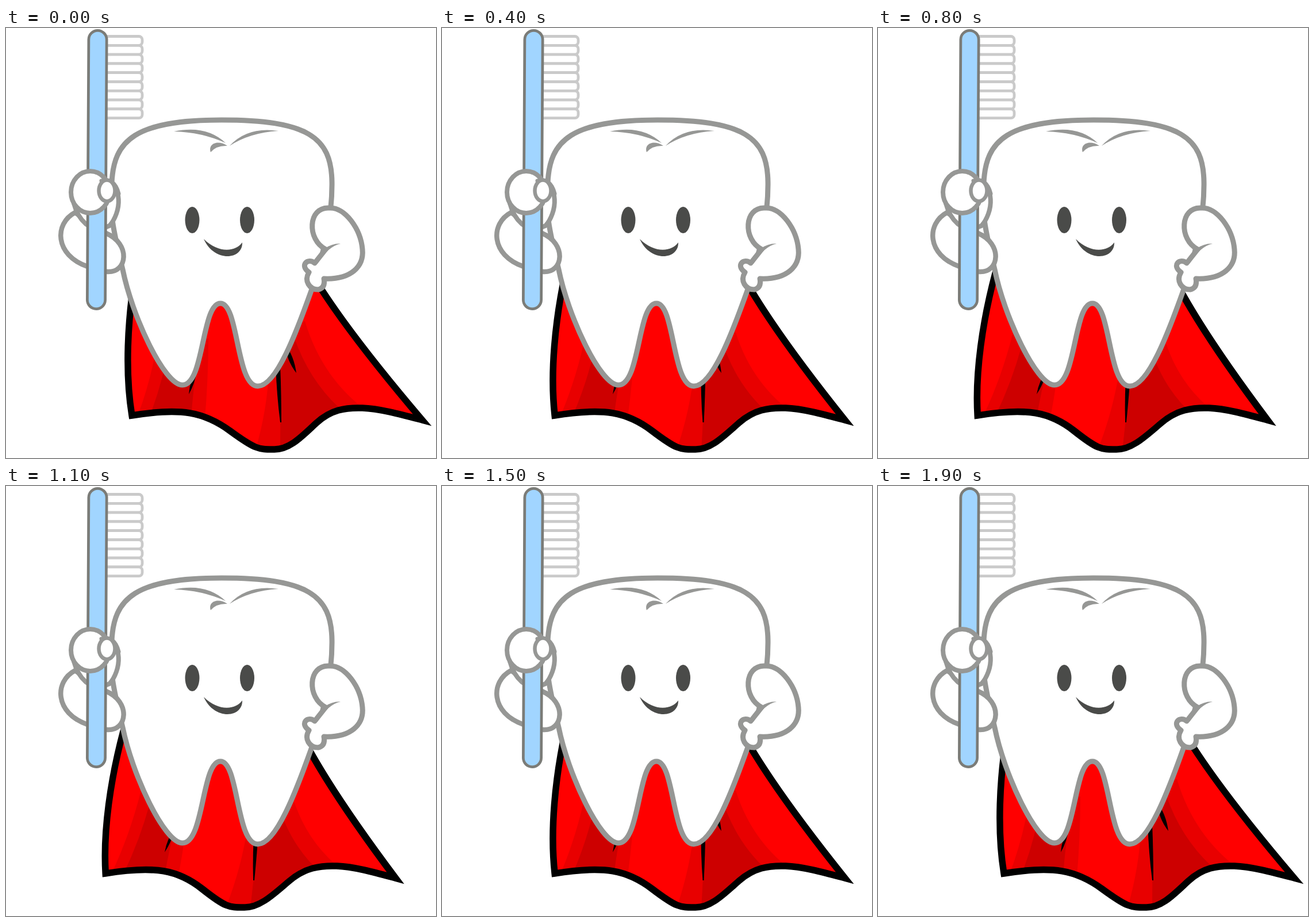
An HTML page that plays this animation: 748x748 px, repeating every 2 s.

```html
<!DOCTYPE html>
<html lang="en">
<head>
<meta charset="utf-8">
<title>Caped tooth</title>
<style>
  html, body { margin: 0; width: 100%; height: 100%; overflow: hidden; background: #fff; }
  svg { display: block; width: 100%; height: 100%; }
</style>
</head>
<body>
<svg id="stage" viewBox="0 0 748 748"></svg>
<script>
const NS = 'http://www.w3.org/2000/svg';
const stage = document.getElementById('stage');
const GREY = '#969795', DARK = '#4a4b49', RED = '#ff0000', MID = '#e80000', DEEP = '#cd0000';

function add(tag, attrs, parent = stage) {
  const el = document.createElementNS(NS, tag);
  for (const name in attrs) el.setAttribute(name, attrs[name]);
  parent.appendChild(el);
  return el;
}

const shape = (d, fill, parent) => add('path', { d, fill }, parent);

const outline = (d, width = 9) => add('path', {
  d, fill: '#fff', stroke: GREY, 'stroke-width': width, 'stroke-linejoin': 'round', 'stroke-linecap': 'round'
});

const oval = (cx, cy, rx, ry, fill, width = 0) => add('ellipse', {
  cx, cy, rx, ry, fill, stroke: GREY, 'stroke-width': width
});

// Cape: shaded lining, creases, then the black hem
const cape = add('g', {});
const hem = 'M225 425C211 510 207 600 219 674C305 660 345 668 390 701S440 733 467 733' +
  'S515 710 540 687S590 660 620 661S690 673 724 682C650 595 575 500 532 428Z';
const clip = add('clipPath', { id: 'lining' }, add('defs', {}));
shape(hem, RED, clip);
const lining = add('g', { 'clip-path': 'url(#lining)' }, cape);
shape(hem, RED, lining);
shape('M266 530Q254 610 227 680H346Q352 610 352 540Z', MID, lining);
shape('M284 550Q272 620 248 680H322Q325 630 334 580Z', DEEP, lining);
shape('M458 590Q454 670 432 740H480V590Z', MID, lining);
shape('M478 510H520Q550 610 630 668L560 740H477Z', MID, lining);
shape('M478 540H502Q530 620 592 672L540 740H477Z', DEEP, lining);
shape('M469 585H477Q479 640 479 686H477Q471 640 469 585Z', '#000', lining);
shape('M332 596Q328 620 318 637Q320 612 332 596Z', '#000', lining);
shape('M484 548Q501 570 505 600Q489 580 484 548Z', '#000', lining);
add('path', { d: hem, fill: 'none', stroke: '#000', 'stroke-width': 11.5, 'stroke-miterlimit': 6 }, cape);

// Tooth
outline('M184 270C187 195 225 160 375 160C525 160 566 190 567 268Q568 350 531 457' +
  'C505 530 470 623 438 623C400 623 405 479 373 479C340 479 345 621 307 621' +
  'C275 621 219 500 203 420C190 365 178 320 184 270Z');
shape('M292 180Q348 168 382 200Q340 181 292 180Z', GREY);
shape('M389 205Q420 171 474 179Q424 182 389 205Z', GREY);
shape('M356 216C351 200 370 194 385 205Q366 204 356 216Z', GREY);
for (const x of [324, 419.5]) oval(x, 334, 12.5, 23, DARK);
shape('M344 367C370 393 400 389 411 373C412 404 362 408 344 367Z', DARK);

// Right arm
outline('M562 313C525 311 523 368 556 385L537 409C525 399 510 413 527 425' +
  'C518 440 528 455 543 455Q556 452 553 436C600 438 623 415 620 385C617 350 590 311 562 313Z');
shape('M534 409Q553 374 582 375Q560 380 542 410Z', GREY);

// Left arm and palm, behind the brush
outline('M120 321C84 340 84 395 142 415L176 424C212 426 217 375 174 357Z', 8.5);
outline('M118 305Q124 328 139 341L157 353L180 344C200 322 207 270 165 263Z', 8);

// Brush
for (let i = 0; i < 9; i++) add('rect', {
  x: 165, y: 14.5 + i * 15.8, width: 72, height: 15.8, rx: 6,
  fill: '#fff', stroke: '#cacaca', 'stroke-width': 4.8
});
const handle = (stroke, width) => add('path', {
  d: 'M159.5 20L157 473', stroke, 'stroke-width': width, 'stroke-linecap': 'round'
});
handle('#7b7c78', 36);
handle('#a1d5ff', 26.5);

// Fist and thumb
oval(146.5, 285.5, 33.5, 36.5, '#fff', 8);
outline('M166 266Q189 260 196 288', 7);
oval(175.5, 283, 14, 18.5, '#fff', 6.5);

// Sway: ten poses out, the same ten back, slower to set off and with a last flick
const PIVOT = 220, SHEAR = 0.0252;
const lean = n => n < 4 ? n / 3 : n < 9 ? n / 2 : 5;

function draw(time) {
  const step = Math.floor(time / 100) % 20;
  const k = SHEAR * (step === 3 || step === 16 ? 1 : lean(Math.min(step, 19 - step)));
  cape.setAttribute('transform', `matrix(1 0 ${-k} 1 ${k * PIVOT} 0)`);
}

const start = performance.now();
function tick() {
  draw(performance.now() - start);
  requestAnimationFrame(tick);
}
draw(0);
requestAnimationFrame(tick);
</script>
</body>
</html>
```
